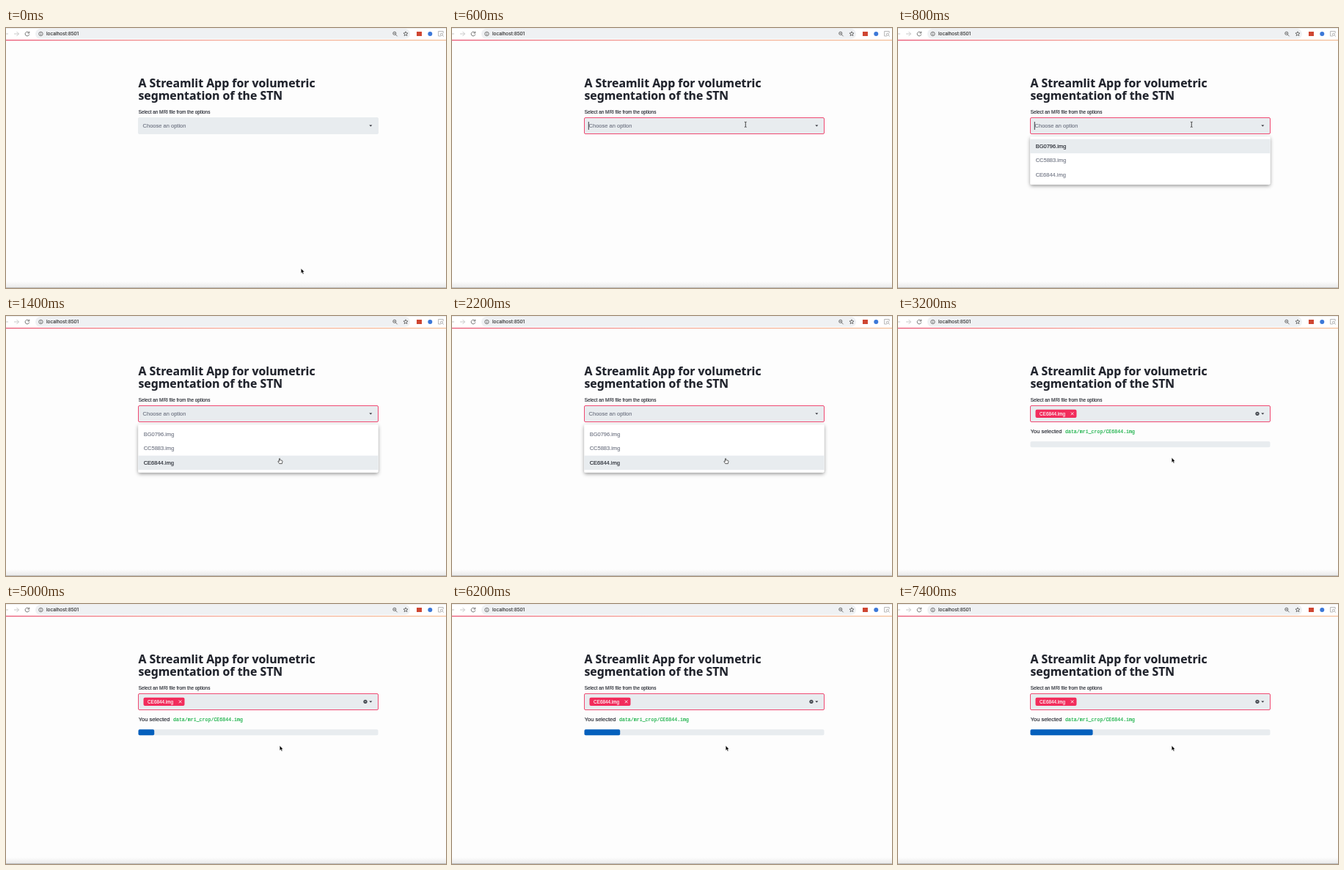
These frames come from a looping animation (600 px wide and 355 px high, 8000 ms). An HTML page:

```html
<!DOCTYPE html>
<html lang="en">
<head>
<meta charset="utf-8">
<title>Volumetric segmentation</title>
<style>
  html, body { margin: 0; width: 100%; height: 100%; overflow: hidden; background: #fdfdfd; }
  svg { display: block; width: 100vw; height: 100vh; }
  text {
    font-family: "Liberation Sans", Arial, sans-serif; font-size: 7.5px;
    color: #1f222b; fill: currentColor; stroke: currentColor; stroke-width: .13; white-space: pre;
  }
  .title { font-family: "Noto Sans", sans-serif; font-size: 15.85px; font-weight: 700; }
  .small { font-size: 6.4px; }
  .muted { color: #717684; }
  .url { font-family: Inter, sans-serif; font-size: 6.5px; color: #2b2b2b; }
  .code { font-family: "Liberation Mono", monospace; font-size: 6.6px; color: #09ab3b; }
  .badge { color: #fff; }
</style>
</head>
<body>
<svg viewBox="0 0 600 355" xmlns="http://www.w3.org/2000/svg">
  <defs>
    <linearGradient id="accent">
      <stop offset="0" stop-color="#ea4d6c"/>
      <stop offset=".5" stop-color="#f4a693"/>
      <stop offset="1" stop-color="#f5bb92"/>
    </linearGradient>
    <linearGradient id="edge" x2="0" y2="1">
      <stop offset="0" stop-color="#fdfdfd"/>
      <stop offset="1" stop-color="#ebebeb"/>
    </linearGradient>
    <filter id="shadow" x="-5%" y="-20%" width="110%" height="145%">
      <feDropShadow dx="0" dy="1.8" stdDeviation="2.8" flood-color="#000" flood-opacity=".42"/>
    </filter>
  </defs>

  <rect width="600" height="355" fill="#fdfdfd"/>
  <g id="toolbar">
    <rect width="600" height="16" fill="#fff"/>
    <rect width="600" height="1" fill="#ececec"/>
    <rect x="40" y="1" width="511" height="14" rx="7" fill="#eff1f3"/>
    <g fill="none" stroke="#555" stroke-width=".8">
      <path stroke="#bbb" d="M-2 8H3M11 8H17.5M14.5 5L17.5 8L14.5 11"/>
      <path d="M31 6.2A2.8 2.8 0 1 0 31.7 8.6M31.8 4.7V7H29.5"/>
      <circle cx="47.5" cy="8" r="2.7"/>
      <path d="M47.5 7.6V9.6M47.5 6.2V6.9"/>
      <circle cx="529.8" cy="7.3" r="2.1"/>
      <path d="M531.3 9L533.6 11.3M528.6 7.3H531"/>
      <path id="star"/>
      <g stroke="#999" stroke-width=".7">
        <path d="M593 11H589.6V4.5H596.2V7"/>
        <circle cx="594" cy="8.7" r="1.6"/>
        <path d="M595.2 9.9L597 11.7"/>
      </g>
    </g>
    <text class="url" x="55" y="10.2">localhost:8501</text>
    <rect x="560" y="5" width="7" height="6" fill="#cf4632"/>
    <circle cx="578.3" cy="8" r="3" fill="#3c78d8"/>
    <rect y="16" width="600" height="1.2" fill="url(#accent)"/>
  </g>

  <text class="title" x="180.5" y="81">A Streamlit App for volumetric</text>
  <text class="title" x="180.5" y="98">segmentation of the STN</text>
  <text class="small" x="180.7" y="116.5">Select an MRI file from the options</text>

  <rect id="field" x="180.5" y="122.5" width="327" height="22" rx="1.5" fill="#e8ecef"/>
  <path d="M495.3 132.4H499.3L497.3 134.6Z" fill="#262730"/>
  <text id="placeholder" class="muted" x="186.6" y="135.7">Choose an option</text>
  <rect id="caret" x="185.8" y="128" width=".9" height="11" fill="#262730"/>

  <g id="tag">
    <rect x="187.5" y="127.8" width="56" height="11.2" rx="2" fill="#f22c5c"/>
    <text class="small badge" x="193" y="135.7">CE6844.img</text>
    <path d="M235.8 131.6L239.4 135.2M239.4 131.6L235.8 135.2" stroke="#fff" stroke-width=".9"/>
    <circle cx="490" cy="133.3" r="2.6" fill="#41454c"/>
    <path d="M489.1 132.4L490.9 134.2M490.9 132.4L489.1 134.2" stroke="#e8ecef" stroke-width=".6"/>
  </g>

  <g id="menu">
    <rect x="180.3" y="148" width="327.2" height="65.7" rx="2" fill="#fff" filter="url(#shadow)"/>
    <rect id="highlight" x="180.3" width="327.2" height="19.5" fill="#e8ecef"/>
  </g>

  <g id="result">
    <text x="180.7" y="160.2">You selected</text>
    <text class="code" x="228" y="160.2">data/mri_crop/CE6844.img</text>
    <rect x="180.5" y="171.2" width="327" height="8" rx="1.8" fill="#e8ecef"/>
    <rect id="bar" x="180.5" y="171.2" height="8" rx="1.8" fill="#0460bd"/>
  </g>

  <rect y="346" width="600" height="8" fill="url(#edge)"/>
  <rect y="354" width="600" height="1" fill="#bcbcbc"/>

  <g id="pointer">
    <path id="arrow" d="M0 0V6.4L1.4 5.1L2.5 7.5L3.5 7L2.5 4.7H4.4Z" fill="#000" stroke="#fff" stroke-width=".3"/>
    <path id="beam" d="M-1.4 -3.6Q0 -3.6 0 -2.6Q0 -3.6 1.4 -3.6M0 -2.6V2.6M-1.4 3.6Q0 3.6 0 2.6Q0 3.6 1.4 3.6" fill="none" stroke="#222" stroke-width=".8"/>
    <path id="hand" d="M-1.5 .6V-3.2Q-.9 -4.2 -.3 -3.2V-1.2L2.3 -.7Q3.2 -.4 3 .8L2.3 3.6H-1.2L-3.1 .8Q-3 -.2 -2.2 .1Z" fill="#fff" stroke="#222" stroke-width=".7"/>
  </g>
</svg>
<script>
const LOOP = 8000, TICK = 200;
const $ = id => document.getElementById(id);
const show = (id, on) => $(id).setAttribute('display', on ? 'inline' : 'none');
const within = (t, from, to) => t >= from && t < to;
// Latest [time, ...values] step that has begun.
const current = (steps, t) => steps.filter(step => step[0] <= t).pop();

const pointerSteps = [
  [0, 'arrow', 402.4, 328.4],
  [200, 'arrow', 396.5, 164.3],
  [400, 'beam', 400.3, 131.8],
  [1000, 'beam', 400, 136.5],
  [1200, 'hand', 386, 181],
  [1400, 'hand', 374, 198],
  [2800, 'arrow', 373.3, 193.5]
];
const highlightSteps = [[0, 0], [1200, 1], [1400, 2]];
const barSteps = [
  [0, 180.5], [4200, 182], [5000, 202.2], [5200, 212.8],
  [5800, 224], [6000, 229.2], [6600, 250], [7400, 265.6]
];

const rowTop = i => 151.6 + 19.5 * i;
const options = ['BG0796.img', 'CC5883.img', 'CE6844.img'].map((name, i) => {
  const label = document.createElementNS('http://www.w3.org/2000/svg', 'text');
  label.textContent = name;
  label.setAttribute('x', 187.7);
  label.setAttribute('y', rowTop(i) + 12.2);
  $('menu').append(label);
  return label;
});

const starPoints = Array.from({ length: 10 }, (_, i) => {
  const r = i % 2 ? 1.4 : 3.2, a = (i / 5 - .5) * Math.PI;
  return [545 + r * Math.cos(a), 8 + r * Math.sin(a)];
});
$('star').setAttribute('d', 'M' + starPoints.join('L') + 'Z');

function render(time) {
  const t = Math.floor((time % LOOP) / TICK) * TICK;

  const focused = t >= 600, selected = t >= 2800;
  $('field').setAttribute('stroke', focused ? '#ef4a72' : '#e8ecef');
  show('placeholder', !selected);
  show('caret', within(t, 600, 1200) || within(t, 1600, 2200));
  show('tag', selected);

  show('menu', within(t, 800, 2800));
  const [, active] = current(highlightSteps, t);
  $('highlight').setAttribute('y', rowTop(active));
  options.forEach((label, i) => label.classList.toggle('muted', i !== active));

  show('result', t >= 3200);
  $('bar').setAttribute('width', current(barSteps, t)[1] - 180.5);

  const [, shape, x, y] = current(pointerSteps, t);
  $('pointer').setAttribute('transform', `translate(${x} ${y})`);
  for (const id of ['arrow', 'beam', 'hand']) show(id, id === shape);
}

let start;
function loop(now) {
  start ??= now;
  render(now - start);
  requestAnimationFrame(loop);
}
render(0);
requestAnimationFrame(loop);
</script>
</body>
</html>
```
